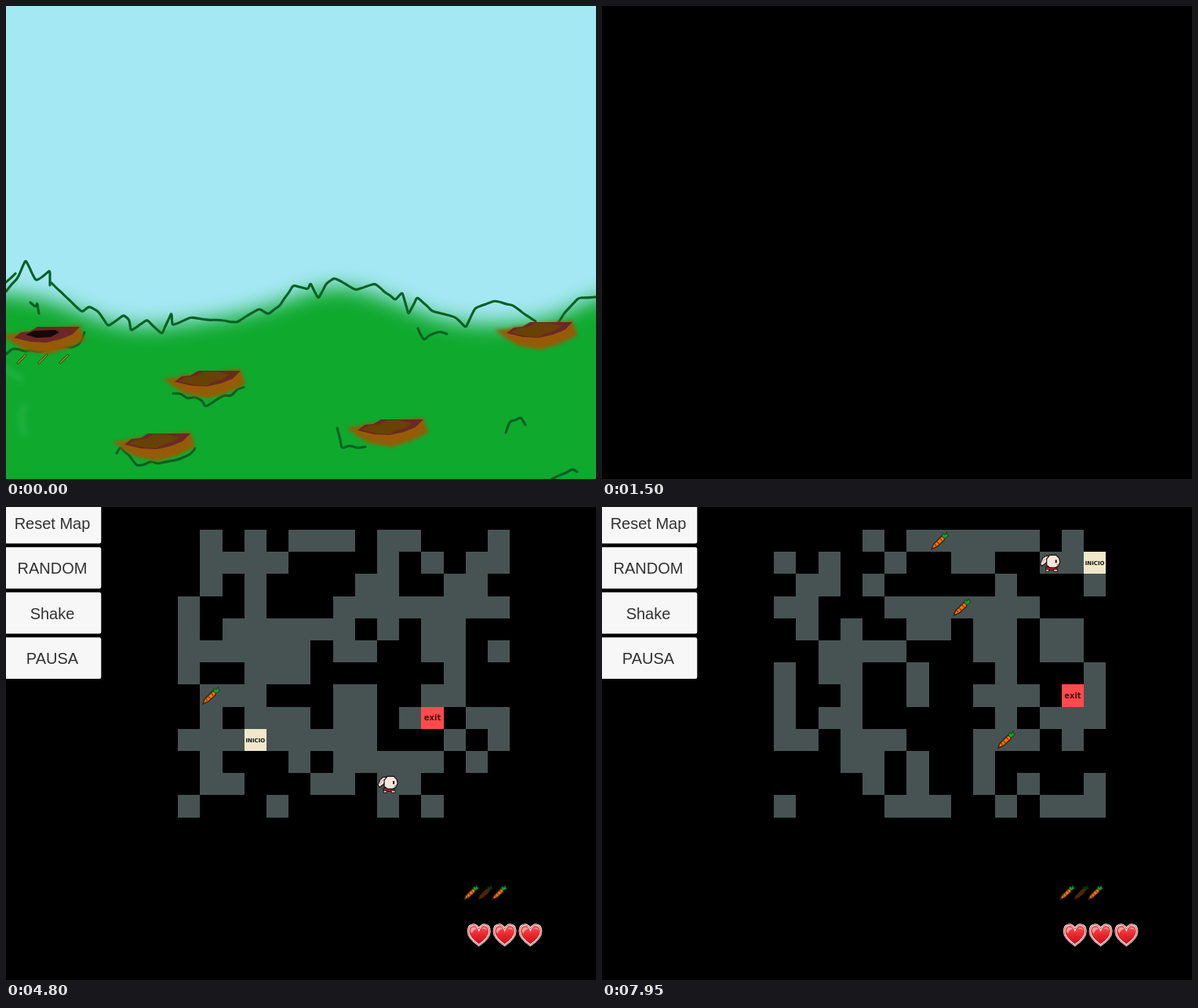
These frames come from a looping animation (752x603 px, 8000 ms). An HTML page with a canvas:

```html
<!DOCTYPE html>
<html lang="en">
<head>
<meta charset="utf-8">
<title>Rabbit maze</title>
<style>
html, body { margin: 0; width: 100%; height: 100%; overflow: hidden; background: #000; }
canvas { display: block; }
</style>
</head>
<body>
<canvas id="stage" width="752" height="603"></canvas>
<script>
const W = 752, H = 603, LOOP = 8000, STEP = 150;
const CELL = 28.2, LEFT = 219.2, TOP = 29;
const ctx = document.getElementById('stage').getContext('2d');

const lerp = (a, b, k) => [a[0] + (b[0] - a[0]) * k, a[1] + (b[1] - a[1]) * k];
const gap = (a, b) => Math.hypot(b[0] - a[0], b[1] - a[1]);
const points = text => text.split(' ').map(p => p.split(',').map(Number));

let seed = 7;
function random() {
  seed = seed * 16807 % 2147483647;
  return seed / 2147483647;
}

function shape(g, d, fill, line, width = 1) {
  const p = new Path2D(d);
  if (fill) { g.fillStyle = fill; g.fill(p); }
  if (line) { g.strokeStyle = line; g.lineWidth = width; g.stroke(p); }
}

function at(g, x, y, scale, draw) {
  g.save();
  g.translate(x, y);
  g.scale(scale, scale);
  draw(g);
  g.restore();
}

// ---- Meadow ----

// Hand-drawn line: key points, a seeded wobble between them, rounded corners
function scribble(g, text, wobble) {
  const keys = points(text), line = [keys[0]];
  for (let i = 1; i < keys.length; i++) {
    const n = Math.max(1, Math.round(gap(keys[i - 1], keys[i]) / 9));
    for (let k = 1; k < n; k++) {
      const [x, y] = lerp(keys[i - 1], keys[i], k / n);
      line.push([x, y + (random() - 0.5) * wobble]);
    }
    line.push(keys[i]);
  }
  g.beginPath();
  g.moveTo(...line[0]);
  for (let i = 1; i < line.length - 1; i++) {
    const [a, b, c] = line.slice(i - 1, i + 2);
    g.lineTo(...lerp(b, a, Math.min(0.45, 3 / gap(a, b))));
    g.quadraticCurveTo(...b, ...lerp(b, c, Math.min(0.45, 3 / gap(b, c))));
  }
  g.lineTo(...line.at(-1));
  g.strokeStyle = '#076022';
  g.lineWidth = 3.1;
  g.stroke();
}

const RIDGE = [
  '0,364 14,348 25,324 38,350 44,347 56,337 56,356',
  '0,352 12,341',
  '58,353 97,390 106,383 117,389 130,408 150,394 157,400 159,414 180,400 199,418 211,391 212,407 235,397 295,403 323,386 334,393 349,382 366,356 385,361 388,353 398,373 408,354 418,347 446,362 470,354 496,375 505,365 513,393 524,371 543,389 573,397 586,410 598,385 622,376 645,381 675,402',
  '703,405 712,391 730,372 752,371'
];

const TUFTS = [
  '31,378 38,384 40,378 42,392', '0,444 8,437 40,441 92,432 100,416',
  '213,494 250,503 254,511 303,486', '141,570 146,562 167,586 229,574 241,564',
  '525,411 533,426 544,418 562,418', '422,538 428,564 458,562',
  '637,544 643,529 656,524 662,534', '696,603 722,590 728,594'
];

// Soft hill edge: smooth curve through a few heights
function hills(g) {
  const p = points('-60,364 0,366 60,376 150,413 250,403 330,386 415,354 480,370 560,404 640,407 700,398 752,370 812,360');
  g.beginPath();
  g.moveTo(-60, H + 60);
  for (let i = 0; i < p.length - 1; i++) g.quadraticCurveTo(...p[i], ...lerp(p[i], p[i + 1], 0.5));
  g.lineTo(812, H + 60);
  g.fillStyle = '#0fa92e';
  g.fill();
}

function hole(g, x, y, dark) {
  at(g, x, y, 1, () => {
    g.filter = 'blur(2px)';
    shape(g, 'M-54-5L-38-6-28-9 0-12 45-17 51 2 28 13 4 20-24 15-38 7Z', '#965b06');
    g.filter = 'blur(0.6px)';
    shape(g, 'M-39-1L-30-8-19-9-9-15 18-15 45-15 35-5 20 1 2 5-18 4Z', '#6b2826');
    if (dark) shape(g, 'M-24-5L-13-10 14-11 19-8 8-2-10-1Z', '#170606');
    else shape(g, 'M-34-2L-24-7-10-9-2-14 14-14 31-10 22-4 8 0 3 4-14 3Z', '#684104');
    g.filter = 'none';
  });
}

function paintMeadow() {
  const c = document.createElement('canvas');
  c.width = W; c.height = H;
  const g = c.getContext('2d');
  g.lineCap = g.lineJoin = 'round';
  g.fillStyle = '#a4e8f3';
  g.fillRect(0, 0, W, H);
  g.filter = 'blur(13px)';
  hills(g);
  g.filter = 'blur(4px)';
  shape(g, 'M-4 463Q10 468 20 476M24 508Q15 526 24 546', null, 'rgba(60,195,95,.5)', 6);
  g.filter = 'none';
  for (const d of RIDGE) scribble(g, d, 2);
  for (const d of TUFTS) scribble(g, d, 6);
  hole(g, 49, 424, true);
  for (const [x, y] of [[254, 480], [190, 560], [487, 542], [677, 418]]) hole(g, x, y);
  for (const x of [20, 47, 74]) {
    const d = `M${x - 5} 455L${x + 5} 445`;
    shape(g, d, null, '#2c4a14', 3);
    shape(g, d, null, '#a59a35', 1.2);
  }
  return c;
}

// ---- Maze ----

const mapA = {
  start: [3, 9], exit: [11, 8], carrots: [[9, 10], [1, 7], [9, 12]],
  rows: `.#.#.###.##...#
.####....#.#.##
.#.#....##..##.
#..#...########
#.######.#.##..
######.##..##.#
#..###......#..
.###...##..##..
.#.###.##.##.##
#########...#.#
.#...#.#####.#.
.##...##.##....
#...#....#.#...`.split('\n')
};
const mapB = {
  start: [3, 5], exit: [2, 9], carrots: [[6, 5], [5, 6], [1, 11]],
  rows: `.###.##.##..#..
#....#..#.#..#.
###.######..#.#
#..#####...#.#.
##...#.####.###
#.##..###.#.###
....###..#..###
#....#...###...
#..#.#.#.##.##.
#.###...##...#.
#..#...#.##.##.
######.#..#..#.
#....##.####.##`.split('\n')
};
const mapC = {
  start: [14, 1], exit: [13, 7], carrots: [[7, 0], [8, 3], [10, 9]],
  rows: `....#.######.#.
#.#..#..##..###
.##.#.....#...#
##...#######...
.#.#..##.##.##.
..####...##.##.
#.##..#...#...#
#..#..#..###.##
#.##......#.###
##.###...###.#.
...##.#..#.....
....#.#..#.#..#
#....###..#.###`.split('\n')
};

function mirror(m) {
  const flip = ([c, r]) => [14 - c, r];
  return {
    start: flip(m.start), exit: flip(m.exit), carrots: m.carrots.map(flip),
    rows: m.rows.map(r => [...r].reverse().join(''))
  };
}

// [from ms, map]
const MAPS = [[1800, mapA], [5250, mapB], [5700, mirror(mapB)], [6150, mirror(mapC)], [6600, mapC]];

const ROUTE = points('3,9 7,9 7,10 9,10 9,12 9,10');

const edge = (origin, i) => Math.round(origin + i * CELL);
const midX = c => LEFT + (c + 0.5) * CELL;
const midY = r => TOP + (r + 0.5) * CELL;

function tile(c, r, color) {
  const x = edge(LEFT, c), y = edge(TOP, r);
  ctx.fillStyle = color;
  ctx.fillRect(x, y, edge(LEFT, c + 1) - x, edge(TOP, r + 1) - y);
}

function label(text, x, y, font, color) {
  ctx.font = font;
  ctx.fillStyle = color;
  ctx.textAlign = 'center';
  ctx.fillText(text, x, y);
}

function carrot(g) {
  shape(g, 'M-11 11L-9 5 2-6 6-5 6-1-4 8Z', '#ee7412', '#40200a', 1.5);
  shape(g, 'M-7 4L-5 7M-4 1L-1 4M0-3L3 0', null, '#7a3408', 1.3);
  shape(g, 'M3-6L4-10 7-8 9-12 10-8 12-7 8-4 6-3Z', '#1f9c2b', '#0b4414', 1);
}

function rabbit(g) {
  const ink = '#1a1010', fur = '#f8e6dd';
  shape(g, 'M-6 5H8V9H-6Z', '#c4202c', ink, 1);
  shape(g, 'M-6 8H-2V11H-6ZM4 8H9V11H4Z', '#efb9ae', ink, 1);
  shape(g, 'M0-9L-6-9-10-6-13 1-11 4-7 1-3-3Z', fur, ink, 1.2);
  shape(g, 'M-5-6L-8-4-10 0', null, '#e8b3ab', 1.6);
  shape(g, 'M-1-10H7L11-6 12-1 10 4 6 6H-1L-5 3-5-5Z', fur, ink, 1.2);
  shape(g, 'M6-4H8V0H6Z', ink);
  shape(g, 'M8 2H11V3H8Z', '#8a2a2a');
}

const HEART = 'M0 13C-6 9-14 3-14-5C-14-16-3-16 0-8C3-16 14-16 14-5C14 3 6 9 0 13Z';

function heart(g) {
  const red = g.createLinearGradient(0, -13, 0, 13);
  red.addColorStop(0, '#f4585a');
  red.addColorStop(0.5, '#e8252b');
  red.addColorStop(1, '#c30f18');
  shape(g, HEART, red, '#fff', 2.6);
  shape(g, HEART, null, '#9c1016', 0.8);
  shape(g, 'M-11-5C-11-11-5-12-3-8C-6-8-8-6-9-2Z', 'rgba(255,200,200,.65)');
  shape(g, 'M4-8C6-12 10-10 11-6C9-8 7-9 4-8Z', 'rgba(255,200,200,.55)');
}

function drawButtons(hover) {
  ['Reset Map', 'RANDOM', 'Shake', 'PAUSA'].forEach((text, i) => {
    const mid = 20.3 + 57.5 * i;
    ctx.beginPath();
    ctx.roundRect(-4, mid - 26.5, 125.3, 52.6, 2.5);
    ctx.fillStyle = hover && text === 'RANDOM' ? '#e6e6e6' : '#f7f7f7';
    ctx.fill();
    label(text, 59, mid + 7.3, '20px "Liberation Sans", Arial, sans-serif', '#323232');
  });
}

// Point at a given distance along a polyline
function along(line, dist) {
  for (let i = 1; i < line.length; i++) {
    const len = gap(line[i - 1], line[i]);
    if (dist <= len) return lerp(line[i - 1], line[i], dist / len);
    dist -= len;
  }
  return line.at(-1);
}

function rabbitCell(t, map) {
  if (t >= 7200) return lerp([14, 1], [12, 1], (t - 7050) / 900);
  if (map !== mapA || t < 3000) return map.start;
  return t < 3300 ? [3, 8.4] : along(ROUTE, (t - 3300) / STEP);
}

function drawMaze(t) {
  const map = MAPS.filter(m => t >= m[0]).pop()[1];
  const eaten = [t >= 4350, false, t >= 4650];
  map.rows.forEach((row, r) => [...row].forEach((ch, c) => {
    if (ch === '#') tile(c, r, '#475353');
  }));
  const [sc, sr] = map.start, [ec, er] = map.exit;
  tile(sc, sr, '#f1e7cb');
  label('INICIO', midX(sc), midY(sr) + 2.7, 'bold 7px "DejaVu Sans", sans-serif', '#17140f');
  tile(ec, er, '#ff4b4b');
  label('exit', midX(ec), midY(er) + 3.2, 'bold 10px "DejaVu Sans", sans-serif', '#4a1010');

  map.carrots.forEach(([c, r], i) => {
    if (map !== mapA || !eaten[i]) at(ctx, midX(c), midY(r), 0.95, carrot);
  });
  const [c, r] = rabbitCell(t, map);
  at(ctx, midX(c), midY(r), 1, rabbit);

  for (let i = 0; i < 3; i++) {
    ctx.globalAlpha = eaten[i] ? 1 : 0.32;
    at(ctx, 593 + 18 * i, 491.5, 0.8, carrot);
    ctx.globalAlpha = 1;
    at(ctx, 602.8 + 32.8 * i, 546, 0.98, heart);
  }
  drawButtons(t >= 5100 && t < 5850);
}

// ---- Playback ----

const meadow = paintMeadow();
const begin = performance.now();
let shown = -1;

function draw(t) {
  ctx.fillStyle = '#000';
  ctx.fillRect(0, 0, W, H);
  if (t < 1500) {
    ctx.globalAlpha = t < 1200 ? 1 : t < 1350 ? 0.72 : 0.36;
    ctx.drawImage(meadow, 0, 0);
    ctx.globalAlpha = 1;
  } else if (t >= 1800) {
    drawMaze(t);
  }
}

function tick() {
  const step = Math.floor((performance.now() - begin) % LOOP / STEP);
  if (step !== shown) {
    shown = step;
    draw(step * STEP);
  }
  requestAnimationFrame(tick);
}
tick();
</script>
</body>
</html>
```
